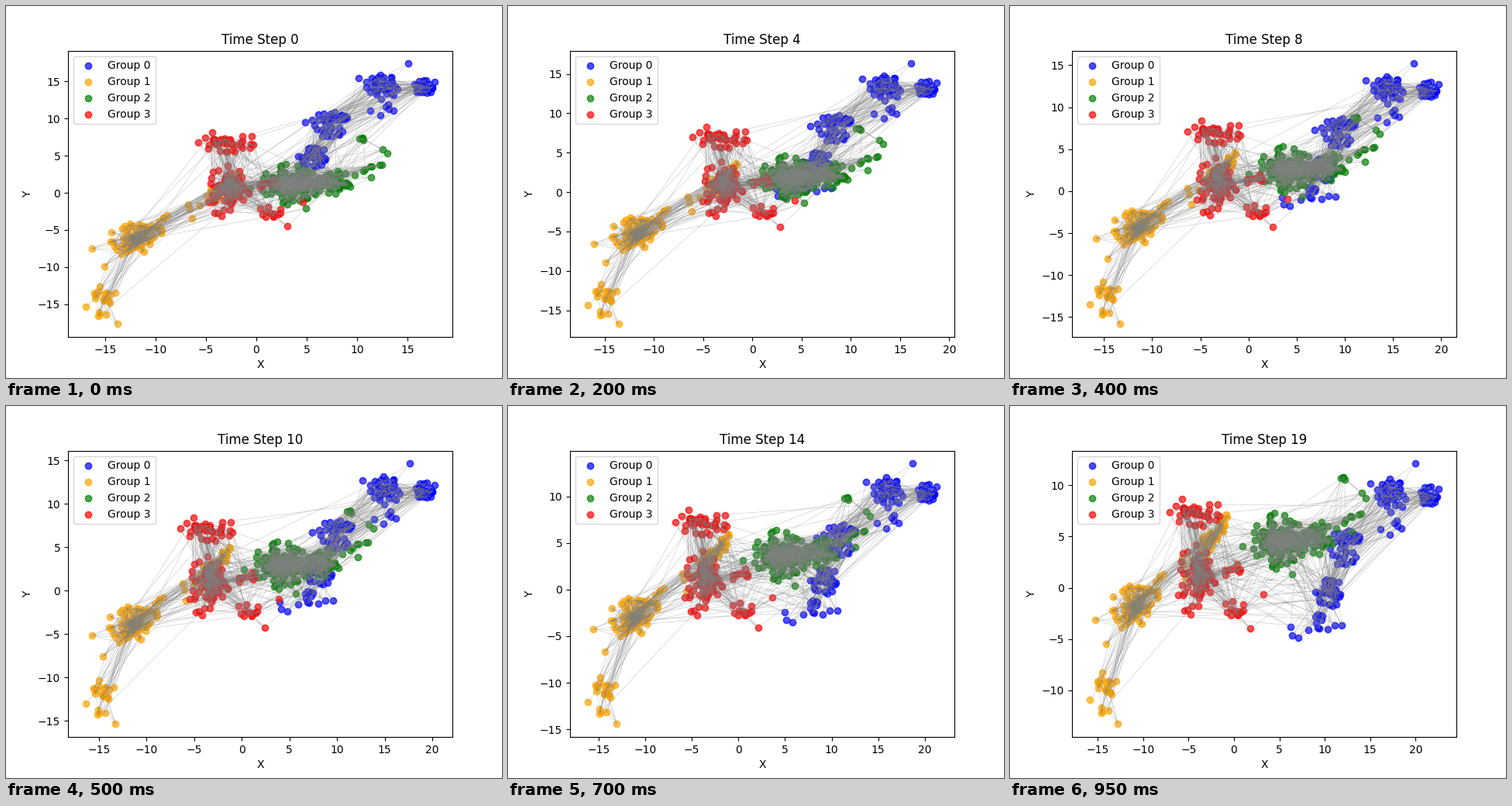
Write a matplotlib script that moves like this. It is 640 by 480 pixels and loops after 1 s.

```python
import numpy as np
import matplotlib.pyplot as plt
from matplotlib.animation import FuncAnimation
from matplotlib.collections import LineCollection

STEPS = 20
rng = np.random.default_rng(7)


def patch(count, spread, start, end=None):
    """Random points around a spot, or along a line from start to end."""
    start = np.array(start, float)
    end = start if end is None else np.array(end, float)
    along = rng.random((count, 1))
    angle = rng.uniform(0, 2 * np.pi, count)
    radius = 2 * spread * rng.random(count) ** 0.7
    offset = radius * np.array([np.cos(angle), np.sin(angle)])
    return start + along * (end - start) + offset.T


# color, drift per step, starting points (corners of the cloud come first)
groups = [
    ('blue', (0.2547, -0.279), np.vstack([
        [(15.1, 17.41), (17.73, 14.95), (10.15, 15.45), (4.85, 9.5)],
        patch(36, 0.85, (12.5, 14.3)),
        patch(26, 0.5, (16.6, 14.3)),
        patch(6, 0.5, (11.8, 11.4), (15.2, 10.3)),
        patch(40, 0.95, (7.4, 9.3)),
        patch(34, 0.75, (5.6, 4.9)),
        patch(15, 0.6, (1.8, 1.3), (7, 2.7))])),
    ('orange', (0.055, 0.2316), np.vstack([
        [(-16.95, -15.3), (-13.8, -17.68), (-16.3, -7.5), (-15.1, -9.9)],
        patch(4, 0.4, (-16.2, -16.6), (-14.5, -16)),
        patch(18, 0.7, (-15, -13.9)),
        patch(50, 1.2, (-12.3, -6.4)),
        patch(24, 0.5, (-12.1, -6.3)),
        patch(14, 0.6, (-11, -5.2), (-9.3, -3.6)),
        patch(4, 0.3, (-7, -3.4), (-6, -1.2)),
        patch(42, 0.45, (-4.8, -1.1), (-1.7, 2.7))])),
    ('green', (0.08, 0.18), np.vstack([
        [(13, 5.35), (12.55, 5.85), (4.9, -2.1), (-0.6, 0.6)],
        patch(4, 0.15, (10.4, 7.2)),
        patch(12, 0.5, (9, 0.7), (12.7, 4.4)),
        patch(75, 1.4, (3.2, 1.2)),
        patch(40, 0.7, (2.9, 0.9)),
        patch(18, 0.9, (5, 0.6), (6.4, 1.8)),
        patch(32, 0.8, (7.8, 1.4))])),
    ('red', (-0.07, 0.028), np.vstack([
        [(-5.77, 6.85), (-4.35, 8.15), (4.6, -1.2), (3.1, -4.5)],
        patch(36, 0.6, (-4.8, 6.6), (-0.8, 6.5)),
        patch(55, 1.15, (-3, -1.7), (-2.2, 2.3)),
        patch(30, 0.6, (-2.4, 0.9)),
        patch(9, 0.5, (1.1, 1.3)),
        patch(12, 0.5, (1, -2.4), (3, -3.3))])),
]


def random_links(points, labels):
    """Link pairs at random; near pairs of one group are favoured."""
    i, j = np.triu_indices(len(points), 1)
    squared = ((points[i] - points[j]) ** 2).sum(axis=1)
    rate = np.where(labels[i] == labels[j], 0.1, 0.01) / (1 + squared / 12)
    keep = rng.random(len(i)) < rate
    return np.column_stack([i[keep], j[keep]])


def padded(values):
    low, high = values.min(), values.max()
    margin = 0.05 * (high - low)
    return low - margin, high + margin


sizes = [len(start) for _, _, start in groups]
labels = np.repeat(np.arange(len(groups)), sizes)
links = random_links(np.vstack([start for _, _, start in groups]), labels)

fig, ax = plt.subplots(figsize=(6.4, 4.8), dpi=100)
dots = [ax.scatter(*start.T, color=color, alpha=0.7, label=f'Group {k}')
        for k, (color, _, start) in enumerate(groups)]
lines = LineCollection([], colors='gray', linewidths=0.4, alpha=0.45, zorder=2)
ax.add_collection(lines)
ax.set_xlabel('X')
ax.set_ylabel('Y')
ax.legend(loc='upper left')
title = ax.set_title('')


def update(step):
    places = [start + step * np.array(drift) for _, drift, start in groups]
    for dot, place in zip(dots, places):
        dot.set_offsets(place)
    points = np.vstack(places)
    lines.set_segments(points[links])
    ax.set_xlim(padded(points[:, 0]))
    ax.set_ylim(padded(points[:, 1]))
    title.set_text(f'Time Step {step}')
    return [*dots, lines, title]


anim = FuncAnimation(fig, update, frames=STEPS, interval=50,
                     repeat=True, repeat_delay=0, blit=False)
plt.show()
```
